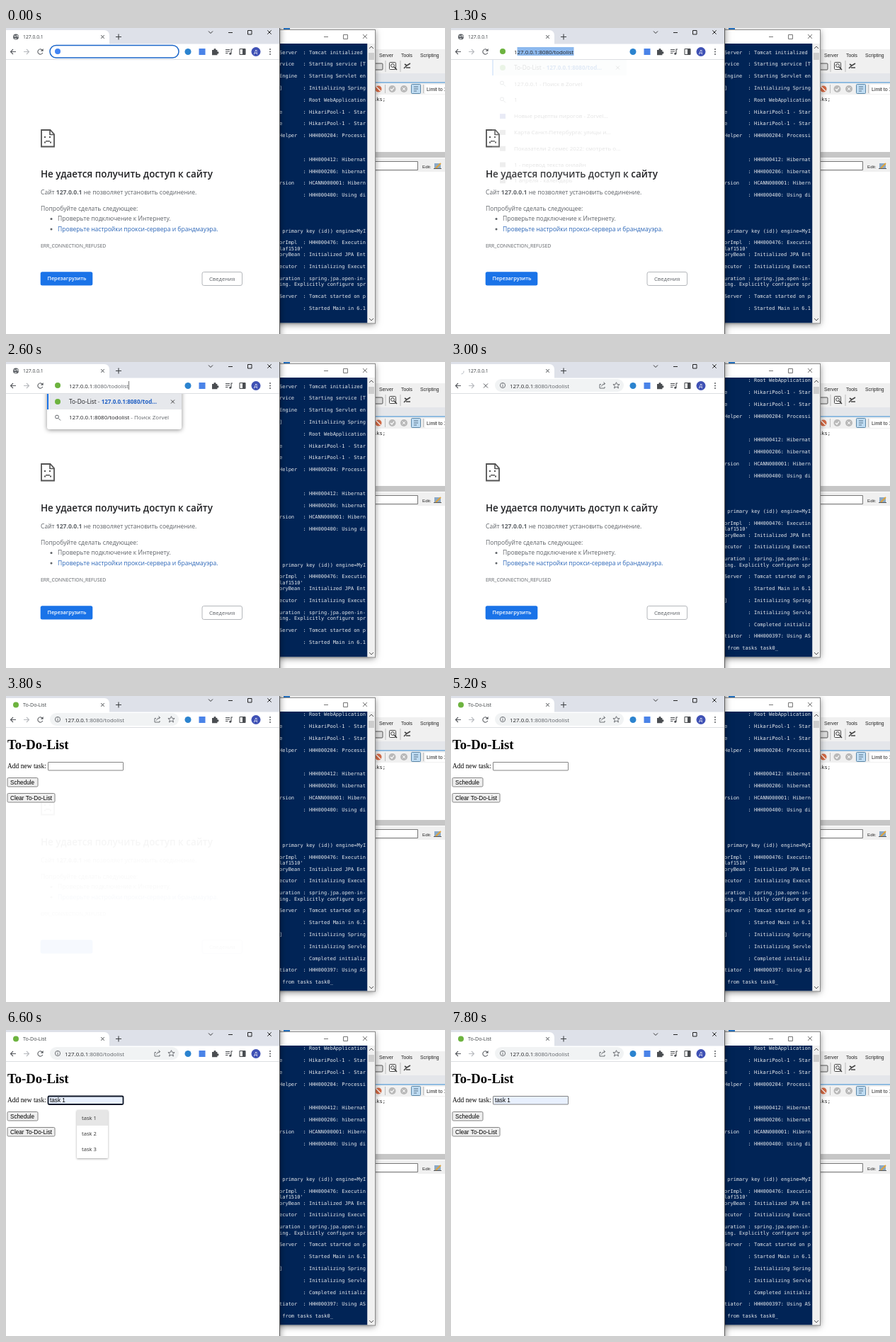
An HTML page with a canvas that plays this animation: 620 px wide and 432 px high, repeating every 8000 ms.

```html
<!DOCTYPE html>
<html lang="ru">
<head>
<meta charset="utf-8">
<style>
html, body { margin: 0; width: 100%; height: 100%; overflow: hidden; background: #fff; }
canvas { display: block; }
</style>
</head>
<body>
<canvas id="stage" width="620" height="432"></canvas>
<script>
const ctx = document.getElementById('stage').getContext('2d');
const UI = '"Open Sans", "Noto Sans", sans-serif';
const ARIAL = '"Liberation Sans", sans-serif';
const SERIF = '"Liberation Serif", serif';
const MONO = '"DejaVu Sans Mono", monospace';
const DARK = '#202124', GREY = '#5f6368', BLUE = '#1a73e8', LEAF = '#6db33f';
const LOOP = 8000, ROW = 8.4;

function rect(x, y, w, h, fill) {
  ctx.fillStyle = fill;
  ctx.fillRect(x, y, w, h);
}
function box(x, y, w, h, r, fill, stroke, width = 1) {
  ctx.beginPath();
  ctx.roundRect(x, y, w, h, r);
  if (fill) { ctx.fillStyle = fill; ctx.fill(); }
  if (stroke) { ctx.strokeStyle = stroke; ctx.lineWidth = width; ctx.stroke(); }
}
function path(d, color, width = 1, fill = false) {
  const shape = new Path2D(d);
  ctx.lineWidth = width;
  ctx.strokeStyle = ctx.fillStyle = color;
  fill ? ctx.fill(shape) : ctx.stroke(shape);
}
function dot(x, y, r, fill) {
  ctx.beginPath();
  ctx.arc(x, y, r, 0, 7);
  ctx.fillStyle = fill;
  ctx.fill();
}
function arc(x, y, r, from, to, color, width = 1) {
  ctx.beginPath();
  ctx.arc(x, y, r, from, to);
  ctx.strokeStyle = color;
  ctx.lineWidth = width;
  ctx.stroke();
}
// Draws text and returns the x where it ends.
function text(str, x, y, size, color = DARK, family = UI, weight = 400) {
  ctx.font = `${weight} ${size}px ${family}`;
  ctx.fillStyle = color;
  ctx.fillText(str, x, y);
  return x + ctx.measureText(str).width;
}
function cross(x, y, r, color) {
  path(`M${x - r} ${y - r}l${2 * r} ${2 * r}m0 ${-2 * r}l${-2 * r} ${2 * r}`, color);
}
function shadowed(blur, alpha, draw) {
  ctx.save();
  ctx.shadowColor = `rgba(0,0,0,${alpha})`;
  ctx.shadowBlur = blur;
  ctx.shadowOffsetY = 1;
  draw();
  ctx.restore();
}
function faded(alpha, draw) {
  ctx.save();
  ctx.globalAlpha = alpha;
  draw();
  ctx.restore();
}
function clipped(x, y, w, h, draw) {
  ctx.save();
  ctx.beginPath();
  ctx.rect(x, y, w, h);
  ctx.clip();
  draw();
  ctx.restore();
}
const steps = (t, start, end) => Math.min(1, Math.max(0, Math.floor((t - start) / 100) / ((end - start) / 100)));

// [row, logger, message]
const log = [
  [0, 'Server', 'Tomcat initialized'], [2, 'rvice', 'Starting service [T'],
  [4, 'Engine', 'Starting Servlet en'], [6, ']', 'Initializing Spring'],
  [8, '', 'Root WebApplication'], [10, 'e', 'HikariPool-1 - Star'],
  [12, 'e', 'HikariPool-1 - Star'], [14, 'Helper', 'HHH000204: Processi'],
  [18, '', 'HHH000412: Hibernat'], [20, '', 'HHH000206: hibernat'],
  [22, 'rsion', 'HCANN000001: Hibern'], [24, '', 'HHH000400: Using di'],
  [30, ' primary key (id)) engine=MyI'], [32, 'orImpl', 'HHH000476: Executin'],
  [33, "laf1510'"], [34, 'oryBean', 'Initialized JPA Ent'],
  [36, 'ecutor', 'Initializing Execut'], [38, 'uration', 'spring.jpa.open-in-'],
  [39, 'ing. Explicitly configure spr'], [41, 'Server', 'Tomcat started on p'],
  [43, '', 'Started Main in 6.1'], [45, ']', 'Initializing Spring'],
  [47, '', 'Initializing Servle'], [49, '', 'Completed initializ'],
  [51, 'tiator', 'HHH000397: Using AS'], [53, ' from tasks task0_']
];

function database() {
  rect(386, 0, 234, 432, '#fff');
  rect(520, 30, 100, 34, '#f0f0f0');
  [['Server', 527], ['Tools', 558], ['Scripting', 585]].forEach(([s, x]) => text(s, x, 40.5, 6.8, '#222', ARIAL));
  box(521, 50, 11, 9, 1, '#ddd', '#555');
  rect(535.5, 46, 1, 16, '#bbb');
  box(541.5, 48.5, 9, 10, 1, '#fff', '#444');
  arc(546, 53, 2.4, 0, 7, '#333');
  path('M548 55l4 4', '#333', 1.5);
  rect(556.5, 46, 1, 16, '#bbb');
  path('M562 57l4-4m0 0l5-3m-5 3l-3-2m2 5h6', '#444', 1.6);
  rect(520, 64, 100, 13, '#e4e6ea');
  rect(520, 76, 100, 2, '#8fbbe0');
  rect(520, 78, 100, 16, '#f0f0f0');
  dot(526, 86, 4.5, '#d36a45');
  path('M523 83l6 6', '#fff', 1.2);
  rect(535, 80, 1, 12, '#bbb');
  dot(545.5, 86, 5, '#b9b9b9');
  path('M543 86l2 2l3-4', '#fff', 1.2);
  dot(562, 86, 5, '#b9b9b9');
  cross(562, 86, 2, '#fff');
  box(572.5, 79.5, 13, 13, 1, '#bfdcf2', '#5b87a8');
  path('M576 83h6m-6 3h6m-6 3h4', '#58758c');
  rect(589, 80, 1, 12, '#bbb');
  box(592, 80, 40, 13, 0, '#fff');
  text('Limit to 1000', 594, 89, 7, '#222', ARIAL);
  text('sks;', 519, 103, 7, '#222', MONO);
  rect(520, 175, 100, 8, '#c6c6c6');
  rect(520, 184, 100, 19, '#f0f0f0');
  box(518.5, 188.5, 63, 12, 0, '#fff', '#777');
  text('Edit:', 588, 197.5, 6.2, '#222', ARIAL);
  rect(605, 191, 9, 8, '#8aa9c6');
  path('M607 198l7-7', '#e0a33b', 2);
  rect(604, 198, 11, 1, '#555');
}

function terminal(t) {
  shadowed(9, .5, () => rect(380, 3, 141, 414, '#fff'));
  rect(386, 0, 135, 3, '#e9e9e9');
  rect(392, 0, 9, 3, '#2671be');
  rect(386, 2, 136, 1, '#8a8a8a');
  path('M449 12.5h6', '#777');
  box(476.5, 9.5, 6, 6, 0, null, '#777');
  cross(507, 12, 3, '#777');
  rect(386, 22, 124.5, 394.5, '#012456');
  rect(510.5, 22, 10.5, 394.5, '#f0f0f0');
  rect(512, 35, 8, 10, '#cdcdcd');
  path('M513 29l3-3l3 3M513 410l3 3l3-3', '#555');
  rect(521, 3, 1, 414, '#8a8a8a');
  rect(386, 416.5, 136, 1, '#8a8a8a');

  const scroll = t < 2800 ? 0 : t < 2900 ? 5 : 9;
  clipped(386, 22, 124, 394, () => {
    for (const [row, start, message] of log) {
      if (row - scroll > 44) continue;
      const y = 36.5 + (row - scroll) * ROW;
      text(start, 386, y, 7, '#e8eaee', MONO);
      if (message) text(': ' + message, 419.5, y, 7, '#e8eaee', MONO);
    }
  });
}

function errorPage() {
  path('M50 144h12.5l5.5 6v17.5h-18z', '#535353', 1.8);
  path('M62 144v6.5h6', '#535353', 1.6);
  rect(54, 153, 2, 2, '#535353');
  rect(61, 153, 2, 2, '#535353');
  rect(56, 159, 6, 1.5, '#535353');
  rect(54, 160.5, 2, 2, '#535353');
  rect(62, 160.5, 2, 2, '#535353');
  text('Не удается получить доступ к сайту', 49, 211, 13.45, DARK, UI, 600);
  let x = text('Сайт ', 49, 234.5, 8.57, GREY);
  x = text('127.0.0.1', x, 234.5, 8.57, GREY, UI, 700);
  text(' не позволяет установить соединение.', x, 234.5, 8.57, GREY);
  text('Попробуйте сделать следующее:', 49, 257.5, 8.57, GREY);
  dot(64, 269.5, 1.5, GREY);
  text('Проверьте подключение к Интернету.', 73, 272, 8.57, GREY);
  dot(64, 284, 1.5, GREY);
  text('Проверьте настройки прокси-сервера и брандмауэра.', 73, 286.5, 8.57, '#2b66b8');
  text('ERR_CONNECTION_REFUSED', 49, 309.5, 6.9, GREY);
  box(48.7, 344.2, 73.6, 19.2, 2.5, BLUE);
  text('Перезагрузить', 58.5, 356, 7.3, '#fff', UI, 600);
  box(277, 344.5, 56.5, 19, 2.5, '#fff', '#b4b7bb');
  text('Сведения', 287, 357, 7.7, GREY);
}

function button(label, y, w, hover) {
  box(2, y, w, 12.5, 1.5, hover ? '#e2e2e2' : '#efefef', '#767676', .9);
  text(label, 6, y + 9, 8.2, '#000', ARIAL);
}

function todoPage(t) {
  text('To-Do-List', 2, 75, 18.7, '#000', SERIF, 700);
  text('Add new task:', 2, 102, 9.5, '#000', SERIF);
  const focused = t >= 6000 && t < 7800, filled = t >= 6600;
  box(59.5, 93.5, 106, 11.5, focused ? 1.5 : .5, filled ? '#e8f0fe' : '#fff',
    focused ? '#101828' : '#767676', focused ? 1.8 : .9);
  if (filled) text('task 1', 62, 102, 8.2, '#000', ARIAL);
  if (t >= 7000 && t < 7600) rect(84, 95, .8, 9, '#000');
  button('Schedule', 115.5, 43, t >= 7600 && t < 7800);
  button('Clear To-Do-List', 137.5, 67);
  const alpha = Math.min(.25 + steps(t, 6000, 6300), 1) - steps(t, 6900, 7200);
  if (t >= 6000 && alpha > 0) faded(alpha, () => {
    shadowed(3, .35, () => box(100, 113, 44, 68, 1, '#fff'));
    if (filled) rect(100, 113, 44, 22, '#e6e6e6');
    [1, 2, 3].forEach(n => text('task ' + n, 107, 105.5 + 21.7 * n, 7.6, '#333'));
  });
}

function url(x, selected) {
  if (selected) rect(93.5, 27, 80, 12, '#8db9ee');
  const end = text('127.0.0.1', x, 36.5, 7.9);
  return text(':8080/todolist', end, 36.5, 7.9, selected ? DARK : GREY);
}

function magnifier(y) {
  arc(72, y - 1, 2.4, 0, 7, GREY);
  path(`M74 ${y + 1}l3 3`, GREY);
}

const history = ['127.0.0.1 - Поиск в Zorvel', '1', 'Новые рецепты пирогов - Zorvel...',
  'Карта Санкт-Петербурга: улицы и...', 'Показатели 2 семес 2022: смотреть о...',
  '1 - перевод текста онлайн', '1 апреля - календарь'];

function suggestions(t) {
  const many = t < 2000;
  const bottom = many ? 230 : 95;
  const alpha = many ? .12 + .88 * steps(t, 1300, 1700) : 1;
  // The shadow falls only below the address bar, and only once the list is solid.
  clipped(50, 45, 206, 200, () => faded(alpha, () =>
    shadowed(6, alpha < 1 ? 0 : .45, () => box(58, 30, 190, bottom - 30, 3, '#fff'))));
  faded(alpha, () => {
    rect(58, 45, 190, 22, '#e6e8ec');
    rect(58, 45, 2, 22, BLUE);
    dot(73, 56, 4, LEAF);
    let x = text('To-Do-List', 89, 59, 8.3);
    x = text(' - ', x, 59, 8.3, GREY);
    text('127.0.0.1:8080/tod...', x, 59, 8, '#1f5fc4', UI, 700);
    cross(235.5, 56, 2.5, '#444');
    if (many) {
      history.forEach((s, i) => {
        const y = 78.5 + 22.8 * i;
        i < 2 ? magnifier(y) : rect(69, y - 3, 8, 7, i === 2 ? '#4b5bb5' : '#777');
        text(s, 89, y + 3, 8);
      });
    } else {
      magnifier(78.5);
      const end = text('127.0.0.1:8080/todolist', 89, 81, 8);
      text(' - Поиск Zorvel', end, 81, 8, GREY);
    }
  });
}

function addressBar(t) {
  if (t >= 2700) {
    box(62, 24, 182, 18, 9, '#f1f3f4');
    arc(73, 33, 3.6, 0, 7, GREY, .9);
    path('M73 32.5v2.6m0-4.6v1', GREY);
    url(83);
    path('M212 31.5h-2v5.5h7v-2M212.5 34.5q1-4 5-4m-2-2l2.2 2l-2.2 2', GREY, .9);
    path('M233.5 28.7l1.4 3h3.2l-2.5 2.1l.9 3.2l-3-1.9l-3 1.9l.9-3.2l-2.5-2.1h3.2z', GREY, .9);
    return;
  }
  if (t < 1300) {
    box(62, 24.5, 182, 17.5, 9, '#fff', '#1b66c9', 1.5);
    dot(73, 33, 4, '#4285f4');
    if (t >= 300 && t < 800) rect(82, 27, 1, 12, '#222');
    return;
  }
  suggestions(t);
  dot(73, 33, 4, LEAF);
  const end = url(89, t < 2000);
  if (t >= 2000) rect(end, 27, .7, 12, '#444');
}

function chrome(t) {
  const loading = t >= 2700 && t < 3300, loaded = t >= 3300;
  rect(0, 0, 386, 24, '#dee1e9');
  box(-8, 3, 154, 30, 7, '#fff');
  rect(0, 22.5, 386, 22, '#fff');
  rect(0, 44, 386, 1, '#dcdee2');
  if (loading) {
    const turn = t / 160;
    arc(14, 13, 4, turn, turn + 1.5, '#b8bcc2');
  } else if (loaded) {
    dot(14, 12.5, 4, LEAF);
  } else {
    dot(14, 12.5, 4, GREY);
    path('M11 11q2 2 4 0t2 2M12 15h3', '#fff', .9);
  }
  loaded ? text('To-Do-List', 24, 15, 7.1, '#3c4043') : text('127.0.0.1', 24, 15, 6.8, '#3c4043');
  cross(136.5, 12.5, 2.2, '#3c4043');
  path('M155 12.5h8m-4-4v8', '#3c4043', 1.1);
  path('M286 4.5l3 3l3-3', '#333');
  path('M314 6.5h6', '#222');
  box(341.5, 3.5, 5.5, 5.5, 0, null, '#222');
  cross(372, 6, 2.7, '#222');

  path('M14 33.5H6.5m3.5-3.5l-3.5 3.5l3.5 3.5', '#55585d', 1.1);
  path('M25 33.5h7.5m-3.5-3.5l3.5 3.5l-3.5 3.5', '#b6b9bd', 1.1);
  if (loading) {
    cross(49, 33.5, 3, '#55585d');
  } else {
    arc(48.5, 33.5, 3.6, .4, 5.4, '#55585d', 1.1);
    path('M52.6 29v3.7h-3.7z', '#55585d', 1, true);
  }
  dot(257, 33.5, 4.5, '#2b83cf');
  rect(272.5, 29, 9, 9, '#4a83e8');
  path('M291 31h2.6a1.5 1.5 0 1 1 2.8 0h2v2.4a1.5 1.5 0 1 1 0 2.8v2h-7.4z', '#4a4d51', 1, true);
  path('M310 30.5h6m-6 2.5h6m-6 2.5h3.5M318 36v-6h2', '#4a4d51', 1.1);
  dot(316.8, 36.2, 1.5, '#4a4d51');
  box(330, 29.5, 8, 8, .5, null, '#4a4d51', 1.1);
  rect(334, 29.5, 4, 8, '#4a4d51');
  dot(353, 33.5, 6.5, '#3f51b5');
  text('Д', 350.2, 36.2, 7.2, '#fff');
  [30, 33.5, 37].forEach(y => dot(373, y, .9, '#4a4d51'));
}

function browser(t) {
  shadowed(10, .55, () => rect(-10, -10, 396, 460, '#fff'));
  if (t < 3300) {
    errorPage();
  } else {
    if (t < 4700) faded(.06 * (1 - steps(t, 3300, 4700)), errorPage);
    todoPage(t);
  }
  chrome(t);
  addressBar(t);
  rect(386, 0, 1, 432, '#5a5a5a');
}

function frame() {
  const t = performance.now() % LOOP;
  database();
  terminal(t);
  browser(t);
  requestAnimationFrame(frame);
}
frame();
</script>
</body>
</html>
```
